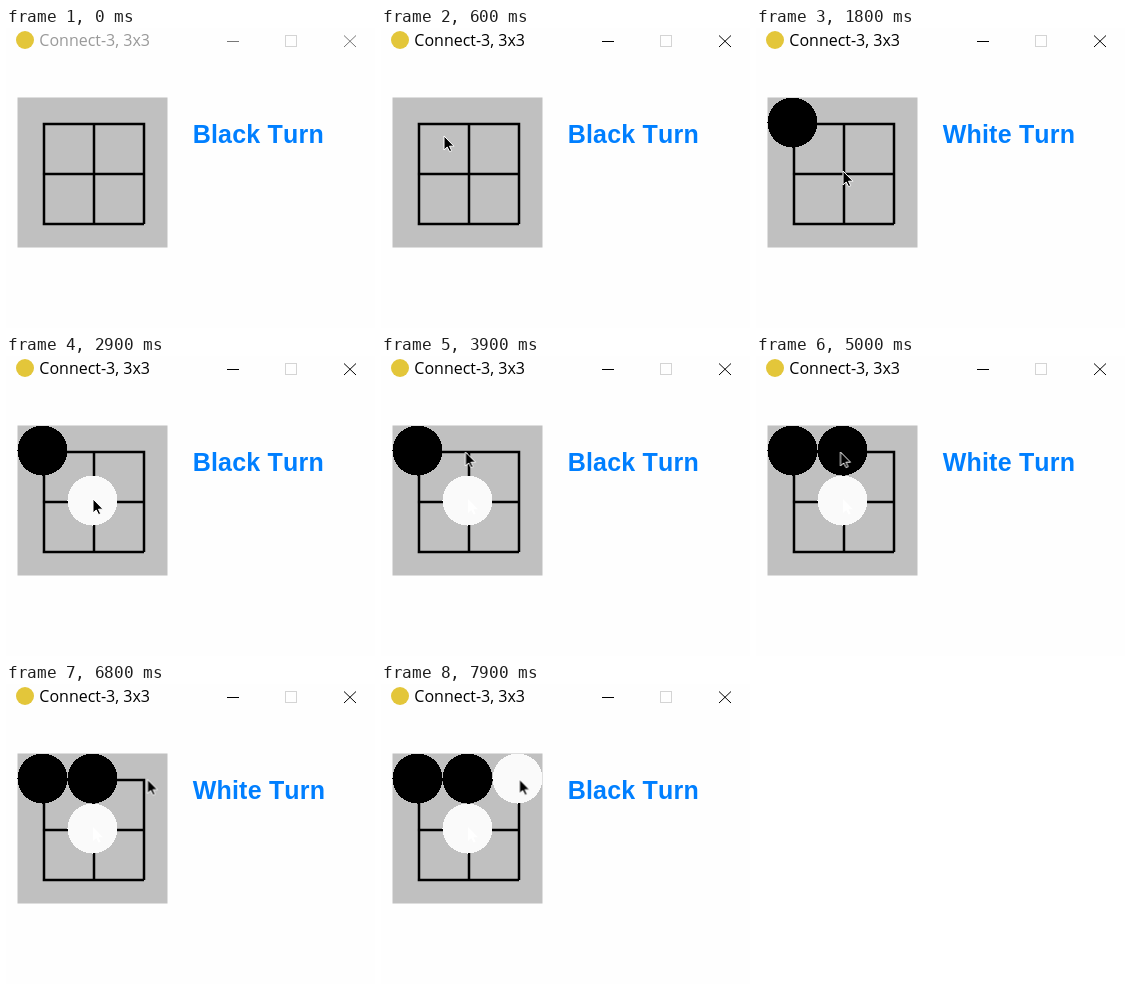
Animation, 369 px wide and 300 px high, one loop 8 s. Source, as an HTML page:

```html
<!DOCTYPE html>
<html lang="en">
<head>
<meta charset="utf-8">
<title>Connect-3, 3x3</title>
<style>
  html, body { margin: 0; width: 100%; height: 100%; overflow: hidden; background: #fefefe; }
  svg { display: block; width: 369px; height: 300px; }

  /* Every change is a hard cut; 1.25% is 100 ms. */
  .bar, .stone, .turn, .trace, .cursor { animation: 8s step-end infinite; }

  .bar { fill: #000; stroke: #000; animation-name: activate; }
  .title { font: 16px "Open Sans", "Noto Sans", sans-serif; stroke: none; }
  .turn { font: bold 25px "Liberation Sans", Arial, sans-serif; letter-spacing: .2px; font-kerning: none; fill: #007fff; }
  .grid { fill: none; stroke: #000; stroke-width: 2.5; }
  .stone { shape-rendering: crispEdges; }
  .white { fill: #fafafa; }
  .trace { fill: #fff; animation-name: from-3500; }
  .cursor { animation-name: move; }

  #s1 { animation-name: from-1100; }
  #s2 { animation-name: from-2900; }
  #s3 { animation-name: from-5000; }
  #s4 { animation-name: from-7000; }
  #blackTurn { animation-name: black-turn; }
  #whiteTurn { animation-name: white-turn; }

  @keyframes activate { 0% { fill: #999; stroke: #777; } 2.5%, 100% { fill: #000; stroke: #000; } }
  @keyframes from-1100 { 0% { opacity: 0; } 13.75%, 100% { opacity: 1; } }
  @keyframes from-2900 { 0% { opacity: 0; } 36.25%, 100% { opacity: 1; } }
  @keyframes from-3500 { 0% { opacity: 0; } 43.75%, 100% { opacity: 1; } }
  @keyframes from-5000 { 0% { opacity: 0; } 62.5%, 100% { opacity: 1; } }
  @keyframes from-7000 { 0% { opacity: 0; } 87.5%, 100% { opacity: 1; } }
  @keyframes black-turn { 0%, 36.25%, 87.5%, 100% { opacity: 1; } 13.75%, 62.5% { opacity: 0; } }
  @keyframes white-turn { 0%, 36.25%, 87.5%, 100% { opacity: 0; } 13.75%, 62.5% { opacity: 1; } }

  @keyframes move {
    0%     { transform: translate(128px, 122px); opacity: 0; }
    2.5%   { transform: translate(128px, 122px); opacity: 1; }
    3.75%  { transform: translate(110px, 121px); opacity: 1; }
    5%     { transform: translate(92px, 118px); opacity: 1; }
    6.25%  { transform: translate(76px, 113px); opacity: 1; }
    7.5%   { transform: translate(63px, 108px); opacity: 1; }
    8.75%  { transform: translate(53px, 103px); opacity: 1; }
    10%    { transform: translate(45px, 98px); opacity: 1; }
    11.25% { transform: translate(40px, 95px); opacity: 1; }
    12.5%  { transform: translate(38px, 94px); opacity: 1; }
    20%    { transform: translate(54px, 112px); opacity: 1; }
    21.25% { transform: translate(78px, 134px); opacity: 1; }
    22.5%  { transform: translate(87px, 143px); opacity: 1; }
    43.75% { transform: translate(86px, 138px); opacity: 1; }
    45%    { transform: translate(83px, 125px); opacity: 1; }
    46.25% { transform: translate(82px, 110px); opacity: 1; }
    47.5%  { transform: translate(83px, 100px); opacity: 1; }
    48.75% { transform: translate(84.5px, 96px); opacity: 1; }
    67.5%  { transform: translate(98px, 96px); opacity: 1; }
    68.75% { transform: translate(118px, 96px); opacity: 1; }
    70%    { transform: translate(130px, 96px); opacity: 1; }
    75%    { transform: translate(138px, 96px); opacity: 1; }
    76.25% { transform: translate(142px, 96px); opacity: 1; }
    85%    { transform: translate(141.5px, 95.5px); opacity: 1; }
    87.5%, 100% { transform: translate(138.5px, 95.5px); opacity: 1; }
  }
</style>
</head>
<body>
<svg viewBox="0 0 369 300">
  <defs>
    <path id="arrow" d="M0 0V14L3.2 11L5.6 15.6L7.7 14.7L5.5 10.2H10Z"/>
  </defs>

  <circle cx="19" cy="12" r="9" fill="#e3c63a"/>
  <g class="bar">
    <text class="title" x="33.3" y="18.3">Connect-3, 3x3</text>
    <path d="M221 13.5H233M338 7.5L350 19M350 7.5L338 19" fill="none"/>
  </g>
  <rect x="279.5" y="7.5" width="11" height="11" fill="none" stroke="#d4d4d4"/>

  <rect x="11.5" y="69.5" width="150" height="150" fill="#c0c0c0"/>
  <path class="grid" d="M36.7 96H138M36.7 146H138M36.7 196H138M38 94.7V196M88 94.7V196M138 94.7V196"/>

  <circle class="stone" id="s1" cx="36.5" cy="94.5" r="25"/>
  <circle class="stone white" id="s2" cx="86.5" cy="144.5" r="25"/>
  <use class="trace" href="#arrow" x="87" y="143"/>
  <circle class="stone" id="s3" cx="86.5" cy="94.5" r="25"/>
  <circle class="stone white" id="s4" cx="136.5" cy="94.5" r="25"/>

  <text class="turn" id="blackTurn" x="186.7" y="114.5">Black Turn</text>
  <text class="turn" id="whiteTurn" x="186.7" y="114.5">White Turn</text>

  <use class="cursor" href="#arrow" stroke="#fff"/>
</svg>
</body>
</html>
```
